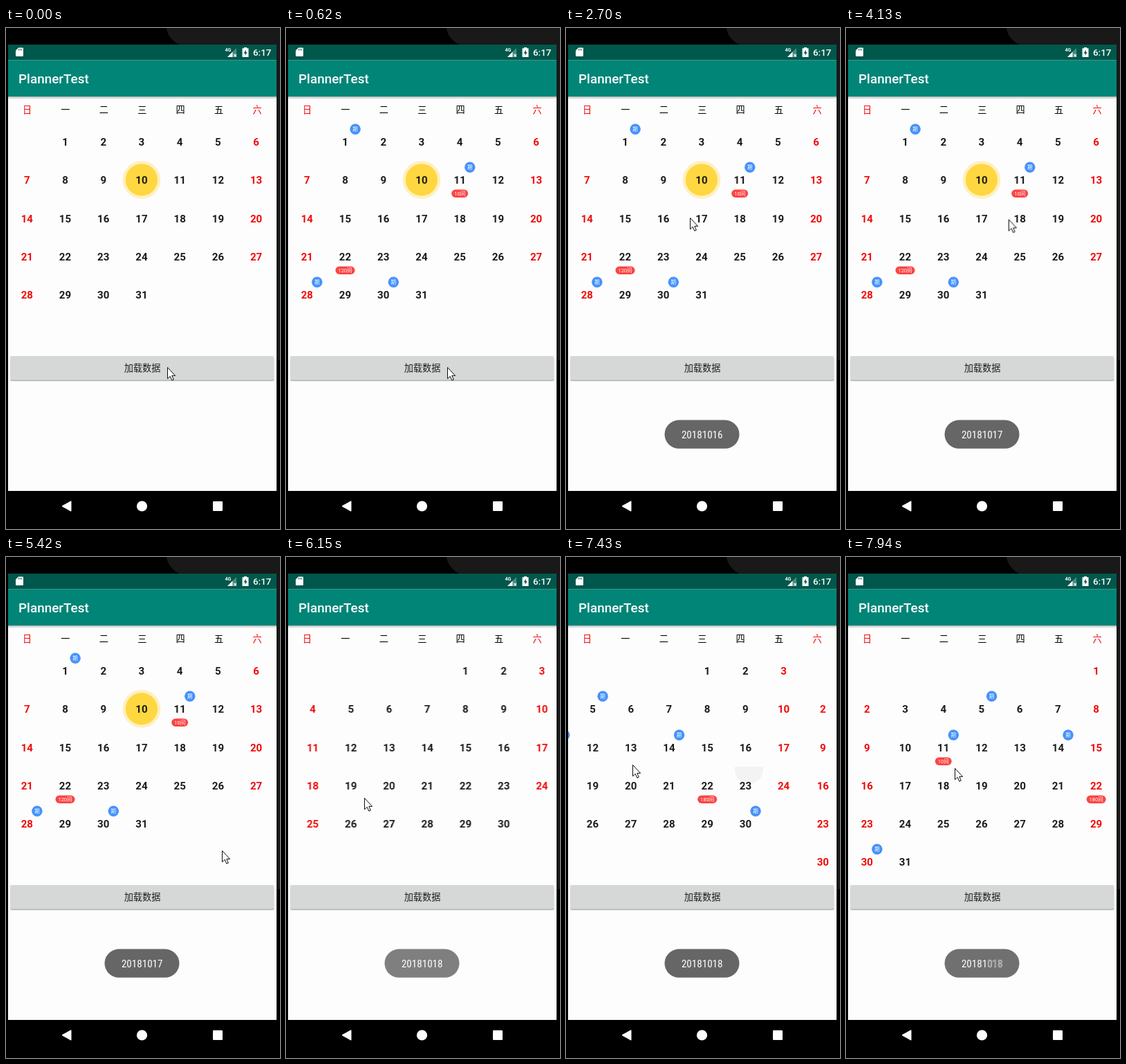
Write an HTML page that moves like this. It is 396 px wide and 724 px high and loops after 8 s.

```html
<!DOCTYPE html>
<html lang="zh">
<head>
<meta charset="utf-8">
<title>Calendar</title>
<style>
  html, body { margin: 0; width: 100%; height: 100%; overflow: hidden; background: #000; }
  svg { display: block; width: 396px; height: 724px; font-family: Roboto, "Noto Sans CJK SC", "Noto Sans CJK", sans-serif; }
  .mid { text-anchor: middle; }
  .cjk { font-family: "Noto Sans CJK SC", "Noto Sans CJK", sans-serif; font-size: 13.2px; }
  .day { font-size: 15.1px; font-weight: 700; fill: #1c1c1c; }
  .red { fill: #f20a0a; }
  .tag { font-size: 7.5px; fill: #fff; }
  #toast text { font: 15.1px "Roboto Condensed", Roboto, sans-serif; font-stretch: 75%; fill: #fff; }

  /* moves advance in screen refreshes, switches are instant */
  #cursor, #pages, #toast { animation: 8s infinite; }
  .switch { animation: 8s step-end infinite; }

  #cursor { animation-name: cursor; }
  @keyframes cursor {
    0% { transform: translate(233px, 490px); }
    12.6% { transform: translate(233px, 490px); animation-timing-function: steps(5); }
    21.98%, 28.68% { transform: translate(142px, 279px); animation-timing-function: steps(3); }
    33.72%, 44.43% { transform: translate(179px, 274px); animation-timing-function: steps(5); }
    53.5%, 55.5% { transform: translate(272px, 278px); animation-timing-function: steps(5); }
    64.17% { transform: translate(325px, 532px); animation-timing-function: steps(3); }
    69.36% { transform: translate(305.5px, 370px); animation-timing-function: steps(4); }
    76.85%, 82.8% { transform: translate(113px, 348px); animation-timing-function: steps(4); }
    89.48% { transform: translate(310px, 303px); animation-timing-function: steps(2); }
    92.85% { transform: translate(96px, 300px); animation-timing-function: steps(4); }
    99.22%, 100% { transform: translate(157px, 305px); }
  }

  #pages { animation-name: swipe; }
  @keyframes swipe {
    0%, 69.36% { transform: none; animation-timing-function: steps(4); }
    76.85% { transform: translate(-379.7px); animation-timing-function: steps(2); }
    80.6%, 89.48% { transform: translate(-388px); animation-timing-function: steps(2); }
    92.85% { transform: translate(-435px); animation-timing-function: steps(2); }
    96.25%, 100% { transform: translate(-776px); }
  }

  #toast { animation-name: fade; }
  @keyframes fade {
    0%, 25.3% { opacity: 0; animation-timing-function: steps(3); }
    30.36%, 69.36% { opacity: 1; animation-timing-function: steps(2); }
    73.12% { opacity: .5; animation-timing-function: steps(3); }
    78.72%, 97.7% { opacity: 1; animation-timing-function: steps(1); }
    99.22%, 100% { opacity: .93; }
  }

  #day16 { animation-name: day16; }
  #day17 { animation-name: day17; }
  #day18 { animation-name: day18; }
  #tail { animation-name: tail; }
  #button { animation-name: press; }
  #ripple { animation-name: ripple; }
  #marks0 { animation-name: load0; }
  #marks1 { animation-name: load1; }
  #marks2 { animation-name: load2; }
  @keyframes day16 { 0% { opacity: 1; } 48%, 100% { opacity: 0; } }
  @keyframes day17 { 0%, 75%, 100% { opacity: 0; } 48% { opacity: 1; } }
  @keyframes day18 { 0% { opacity: 0; } 75%, 100% { opacity: 1; } }
  @keyframes tail { 0% { fill-opacity: 1; stroke-opacity: 0; } 99.22%, 100% { fill-opacity: 0; stroke-opacity: 1; } }
  @keyframes press { 0%, 7.74%, 100% { fill: #d6d7d7; } 6.25% { fill: #c6c7c7; } }
  @keyframes ripple { 0%, 94.5%, 100% { opacity: 0; } 89.48% { opacity: 1; } }
  @keyframes load0 { 0% { opacity: 0; } 7.74%, 100% { opacity: 1; } }
  @keyframes load1 { 0% { opacity: 0; } 80.6%, 100% { opacity: 1; } }
  @keyframes load2 { 0% { opacity: 0; } 97.74%, 100% { opacity: 1; } }
</style>
</head>
<body>
<svg viewBox="0 0 396 724">
  <defs>
    <linearGradient id="shade" x2="0" y2="1">
      <stop offset="0" stop-color="#000" stop-opacity=".28"/>
      <stop offset="1" stop-color="#000" stop-opacity="0"/>
    </linearGradient>
    <clipPath id="screen"><rect x="3" y="99" width="388" height="570"/></clipPath>
  </defs>

  <!-- device -->
  <rect width="396" height="724"/>
  <path d="M232 0Q234 15 250 24H391V480H396V0Z" fill="#191919"/>
  <rect x="3" y="24" width="388" height="645" fill="#fdfdfd"/>
  <rect x="3" y="99" width="388" height="4" fill="url(#shade)"/>
  <rect x="3" y="24" width="388" height="22.5" fill="#00574b"/>
  <rect x="3" y="46.5" width="388" height="52.5" fill="#008577"/>

  <!-- status bar -->
  <g fill="#fff">
    <path d="M18 28.5H24Q25 28.5 25 29.5V40Q25 41 24 41H15Q14 41 14 40V32.5Z"/>
    <path d="M18.5 30v2.5M20.6 30v2.5M22.7 30v2.5" stroke="#00574b" stroke-width=".9"/>
    <text x="316.5" y="34" font-size="7" font-weight="700">4G</text>
    <path d="M333 29V42H320Z" opacity=".3"/>
    <path d="M327.5 34.5V42H320Z"/>
    <path d="M329.5 38L333 41.5M333 38L329.5 41.5" stroke="#fff" stroke-width="1.1"/>
    <path d="M344 28H348V29.3H350.5V42H341.5V29.3H344Z"/>
    <path d="M346.8 31.5L343.6 36.4H345.6V40L348.6 35H346.8Z" fill="#00574b"/>
    <text x="357" y="40" font-size="13.4" font-weight="500">6:17</text>
    <text x="18" y="80" font-size="18.9" font-weight="500">PlannerTest</text>
  </g>

  <g id="week" class="mid cjk"></g>
  <g clip-path="url(#screen)"><g id="pages" class="mid"></g></g>

  <!-- button -->
  <rect x="6" y="475.5" width="381.5" height="35" rx="2" opacity=".16"/>
  <rect x="6.5" y="475" width="380.5" height="34.8" rx="2" opacity=".2"/>
  <rect id="button" class="switch" x="6" y="474" width="381" height="34.8" rx="2"/>
  <text class="mid cjk" x="197" y="496" fill="#1e1e1e">加载数据</text>

  <g id="toast" class="mid">
    <rect x="142.5" y="566.6" width="108" height="41.2" rx="20.6" fill="#666"/>
    <text id="day16" class="switch" x="196.7" y="593">20181016</text>
    <text id="day17" class="switch" x="196.7" y="593">20181017</text>
    <text id="day18" class="switch" x="196.7" y="593">20181<tspan id="tail" class="switch" stroke="#ddd" stroke-width=".6">018</tspan></text>
  </g>

  <!-- navigation -->
  <g fill="#fff">
    <path d="M81 691L94 683.8V698.2Z" stroke="#fff" stroke-linejoin="round"/>
    <circle cx="196.5" cy="691" r="7.6"/>
    <rect x="299" y="684" width="14" height="14" rx="1"/>
  </g>

  <path id="cursor" d="M.5 .5V16.8L4.2 13.3L6.8 19.2L9.3 18.1L6.8 12.4H11.6Z" fill="#fff" stroke="#0a0a14" stroke-linejoin="round"/>
</svg>

<script>
const PAGE = 388, COL = 55.22, ROW = 55.2;
const $ = id => document.getElementById(id);

// first: weekday column of day 1; rooms: [day, rooms left]
const months = [
  { first: 1, days: 31, today: 10, tags: [1, 11, 28, 30], rooms: [[11, 10], [22, 120]] },
  { first: 4, days: 30, tags: [5, 11, 14, 30], rooms: [[11, 10], [22, 180]] },
  { first: 6, days: 31, tags: [5, 11, 14, 30], rooms: [[11, 10], [22, 180]] }
];

const weekend = col => col % 6 ? '' : ' red';

// x is the middle of the cell, y the baseline of its number
function cellAt(month, day) {
  const n = month.first + day - 1, col = n % 7;
  return { col, x: 30.3 + col * COL, y: Math.round(170.2 + Math.floor(n / 7) * ROW) };
}

function dayMark(month, day) {
  const { col, x, y } = cellAt(month, day);
  return `<text class="day${weekend(col)}" x="${x}" y="${y}">${day}</text>`;
}

function todayMark(month) {
  const { x, y } = cellAt(month, month.today);
  return `<circle cx="${x}" cy="${y - 5.6}" r="27.4" fill="#fff0c0"/>
    <circle cx="${x}" cy="${y - 5.6}" r="23.2" fill="#ffd740"/>`;
}

function tagMark(month, day) {
  const { x, y } = cellAt(month, day);
  return `<circle cx="${x + 14.6}" cy="${y - 23.8}" r="7.7" fill="#4592fb"/>
    <text class="tag" x="${x + 14.6}" y="${y - 21}">期</text>`;
}

function roomMark(month, day, left) {
  const { x, y } = cellAt(month, day), label = left + '间';
  const w = 11.6 + label.length * 4.1;
  return `<rect x="${x - w / 2}" y="${y + 8.4}" width="${w}" height="11.6" rx="5.8" fill="#fc4444"/>
    <text class="tag" x="${x}" y="${y + 17}">${label}</text>`;
}

function monthMarkup(month, i) {
  const days = Array.from({ length: month.days }, (_, d) => dayMark(month, d + 1));
  const marks = [
    ...month.tags.map(day => tagMark(month, day)),
    ...month.rooms.map(([day, left]) => roomMark(month, day, left))
  ];
  return `<g transform="translate(${i * PAGE})">
    ${month.today ? todayMark(month) : ''}${days.join('')}
    <g id="marks${i}" class="switch">${marks.join('')}</g></g>`;
}

$('week').innerHTML = [...'日一二三四五六'].map((name, col) =>
  `<text class="${weekend(col)}" x="${30.5 + col * PAGE / 7}" y="123">${name}</text>`).join('');
$('pages').innerHTML =
  `<path id="ripple" class="switch" transform="translate(${PAGE})" d="M291 303h41v4a20.5 20.5 0 0 1-41 0z" fill="#f3f3f3"/>` +
  months.map(monthMarkup).join('');
</script>
</body>
</html>
```
